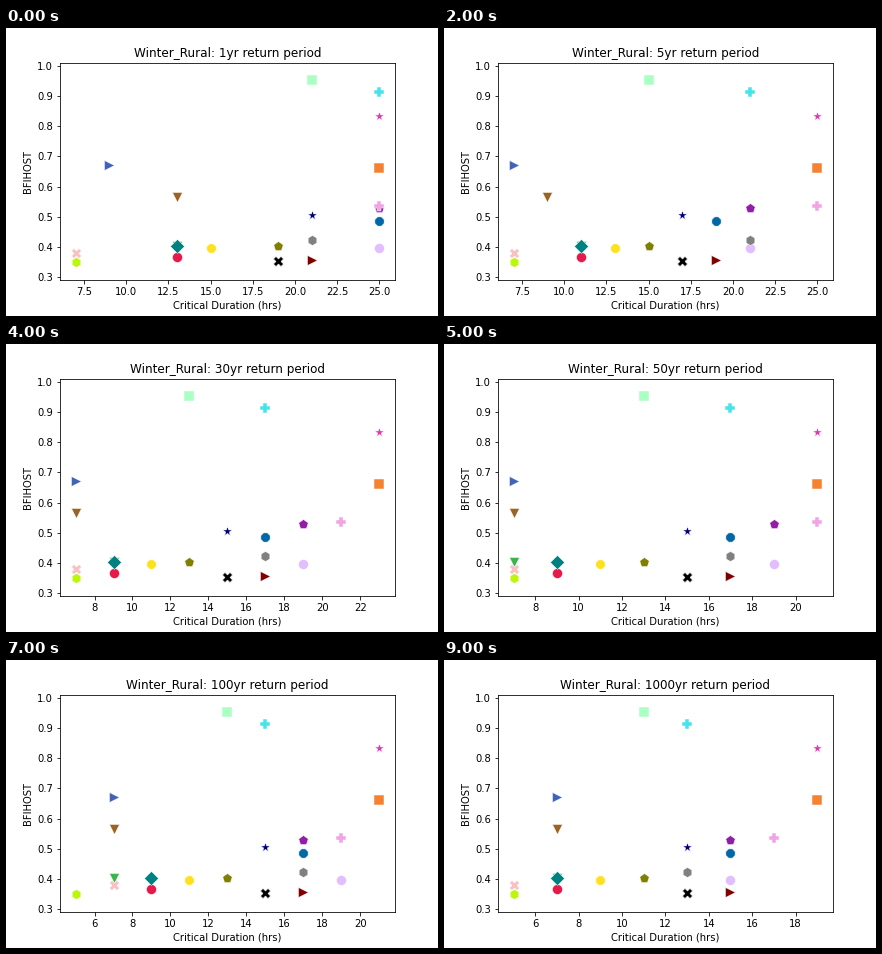
Write a matplotlib script that moves like this. It is 432 by 288 pixels and loops after 10 s.

```python
import matplotlib.pyplot as plt
import numpy as np
from itertools import cycle
from matplotlib.animation import FuncAnimation

PERIODS = (1, 2, 5, 10, 30, 50, 75, 100, 200, 1000)
MARKERS = cycle("ov8>spP*hXD")
LONGEST = 25  # hours

# colour, BFIHOST, critical duration at the 1, 10 and 1000 yr periods
SITES = [
    ("#e6194b", 0.367, (12.9, 10.9, 6.9)),
    ("#3cb44b", 0.404, (13.5, 8.8, 6.2)),
    ("#ffe01c", 0.397, (14.5, 11.6, 8.5)),
    ("#4363b8", 0.672, (8.5, 7, 7)),
    ("#f58231", 0.662, (25, 24, 18.1)),
    ("#911ea8", 0.529, (24.5, 19.9, 15.9)),
    ("#46e4ea", 0.912, (25, 18.5, 12.5)),
    ("#e236b4", 0.834, (25, 24, 18.1)),
    ("#bcf60c", 0.350, (7, 7, 4.5)),
    ("#f8c0c0", 0.380, (7, 7, 5)),
    ("#008080", 0.403, (12.9, 10.9, 6.9)),
    ("#e2beff", 0.397, (25, 20.5, 15.5)),
    ("#9a6324", 0.567, (12.5, 8.5, 6.2)),
    ("#0068a4", 0.485, (24.1, 18.1, 14.1)),
    ("#800000", 0.356, (20.5, 18.5, 15)),
    ("#aaffc3", 0.953, (20.2, 14.1, 10.1)),
    ("#808000", 0.404, (18.5, 14.5, 11)),
    ("#f0a4e6", 0.535, (30, 21.9, 16.9)),
    ("#000075", 0.505, (20.5, 16.5, 13)),
    ("#808080", 0.424, (21.5, 19.4, 13.4)),
    ("#000000", 0.354, (18.5, 16.5, 13)),
]


def duration(keys, period):
    """Interpolate on the log of the period, then snap to an odd hour."""
    hours = np.interp(np.log10(period), (0, 1, 3), keys)
    return min(2 * int(hours // 2) + 1, LONGEST)


fig, ax = plt.subplots(figsize=(6, 4), dpi=72)
fig.subplots_adjust(left=0.125, right=0.9, bottom=0.125, top=0.88)
ax.set_ylim(0.2902, 1.0112)
ax.set_xlabel("Critical Duration (hrs)")
ax.set_ylabel("BFIHOST")
title = ax.set_title("")

dots = [
    ax.scatter([], [], s=100, marker=marker, color=color,
               edgecolors="white", linewidths=0.48)
    for (color, *_), marker in zip(SITES, MARKERS)
]


def update(step):
    period = PERIODS[step]
    hours = [duration(keys, period) for *_, keys in SITES]
    for dot, x, (_, bfi, _) in zip(dots, hours, SITES):
        dot.set_offsets([(x, bfi)])
    low, high = min(hours), max(hours)
    pad = 0.0512 * (high - low)
    ax.set_xlim(low - pad, high + pad)
    title.set_text(f"Winter_Rural: {period}yr return period")
    return dots + [title]


anim = FuncAnimation(fig, update, frames=len(PERIODS), interval=1000,
                     repeat=True, repeat_delay=0, blit=False)
plt.show()
```
